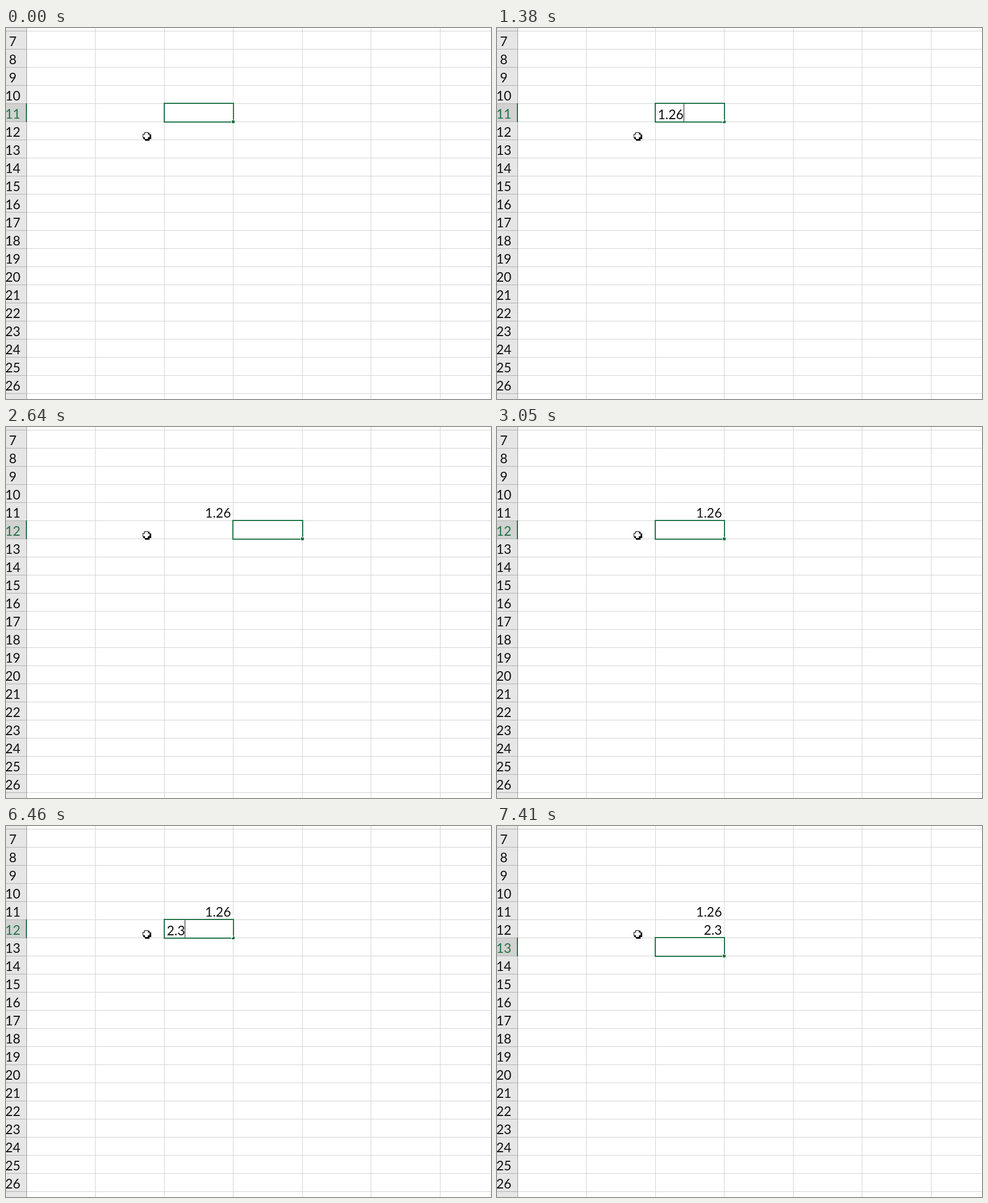
These frames come from a looping animation (855x655 px, 8000 ms). An HTML page with a canvas:

```html
<!DOCTYPE html>
<html lang="en">
<head>
<meta charset="utf-8">
<title>Typing into a sheet</title>
<style>
  html, body { margin: 0; width: 100%; height: 100%; overflow: hidden; background: #fff; }
  canvas { display: block; }
</style>
</head>
<body>
<canvas id="stage" width="855" height="655"></canvas>
<script>
const W = 855, H = 655, LOOP = 8000;
const ROW_H = 32, COL_W = 121.5, HEAD_W = 36, FIRST_ROW = 7, TOP = 5;
const GREEN = '#217346';
const ctx = document.getElementById('stage').getContext('2d');

// Each step overrides parts of the state from its time on.
const steps = [
  { at: 0, row: 11, col: 2, edit: null, caret: 0, values: {} },
  { at: 710, edit: '', caret: 1 },
  { at: 830, edit: '1' },
  { at: 980, edit: '1.' },
  { at: 1230, edit: '1.2' },
  { at: 1380, edit: '1.26' },
  { at: 1790, caret: 0.5 },
  { at: 1940, caret: 0 },
  { at: 2370, edit: null, values: { 11: '1.26' } },
  { at: 2520, row: 12 },
  { at: 2640, col: 3 },
  { at: 3050, col: 2 },
  { at: 5760, edit: '', caret: 1 },
  { at: 5880, edit: '2' },
  { at: 6030, edit: '2.' },
  { at: 6460, edit: '2.3' },
  { at: 6890, caret: 0.5 },
  { at: 7010, caret: 0 },
  { at: 7290, edit: null, values: { 11: '1.26', 12: '2.3' } },
  { at: 7410, row: 13 }
];

const stateAt = t => Object.assign({}, ...steps.filter(s => s.at <= t));
const rowY = row => TOP + (row - FIRST_ROW) * ROW_H;
const colX = col => Math.floor(HEAD_W + col * COL_W);

function rect(x, y, w, h, color) {
  ctx.fillStyle = color;
  ctx.fillRect(x, y, w, h);
}

function label(text, x, y, align, color = '#111') {
  ctx.textAlign = align;
  ctx.fillStyle = color;
  ctx.fillText(text, x, y);
}

function drawGrid() {
  rect(0, 0, W, H, '#fff');
  for (let y = TOP; y < H; y += ROW_H) rect(0, y, W, 1, '#d4d4d4');
  for (let c = 1; colX(c) < W; c++) rect(colX(c), 0, 1, H, '#d4d4d4');
}

function drawHeaders(active) {
  rect(0, 0, HEAD_W, H, '#e6e6e6');
  rect(0, rowY(active), HEAD_W, ROW_H, '#d2d2d2');
  for (let row = FIRST_ROW; rowY(row) < H; row++) {
    const y = rowY(row);
    rect(0, y, HEAD_W, 1, '#b1b1b1');
    label(row, 12, y + 27, 'center', row === active ? GREEN : '#111');
  }
  rect(HEAD_W, 0, 1, H, '#9b9b9b');
  rect(HEAD_W - 1, rowY(active), 2, ROW_H + 1, GREEN);
}

function drawSelection({ row, col, edit, caret }) {
  const x = colX(col), y = rowY(row);
  const r = colX(col + 1), b = y + ROW_H;
  rect(x - 1, y - 1, r - x + 3, b - y + 3, GREEN);
  rect(x + 1, y + 1, r - x - 1, b - y - 1, '#fff');
  rect(r - 3, b - 3, 6, 6, '#fff');
  rect(r - 2, b - 2, 5, 5, GREEN);
  if (edit === null) return;

  rect(x + 1, y + 1, r - x - 1, b - y - 1, '#fff');
  label(edit, x + 4.4, y + 27.5, 'left');
  const end = x + 4.4 + ctx.measureText(edit).width;
  ctx.globalAlpha = caret;
  rect(Math.floor(end + 0.4), y + 1, 1, b - y - 1, '#111');
  ctx.globalAlpha = 1;
}

function plus(x, y, size, arm, color) {
  const inset = (size - arm) / 2;
  rect(x + inset, y, arm, size, color);
  rect(x, y + inset, size, arm, color);
}

function drawPointer() {
  plus(242, 185, 14, 8, '#000');
  plus(241, 184, 13, 7, '#000');
  plus(242, 185, 11, 5, '#fff');
}

function draw(t) {
  const state = stateAt(t);
  ctx.font = '23px Lato, "Open Sans", sans-serif';
  drawGrid();
  drawHeaders(state.row);
  drawSelection(state);
  for (const [row, text] of Object.entries(state.values)) {
    label(text, colX(3) - 3.5, rowY(+row) + 26.5, 'right');
  }
  drawPointer();
}

const start = performance.now();
function tick() {
  draw((performance.now() - start) % LOOP);
  requestAnimationFrame(tick);
}
tick();
</script>
</body>
</html>
```
